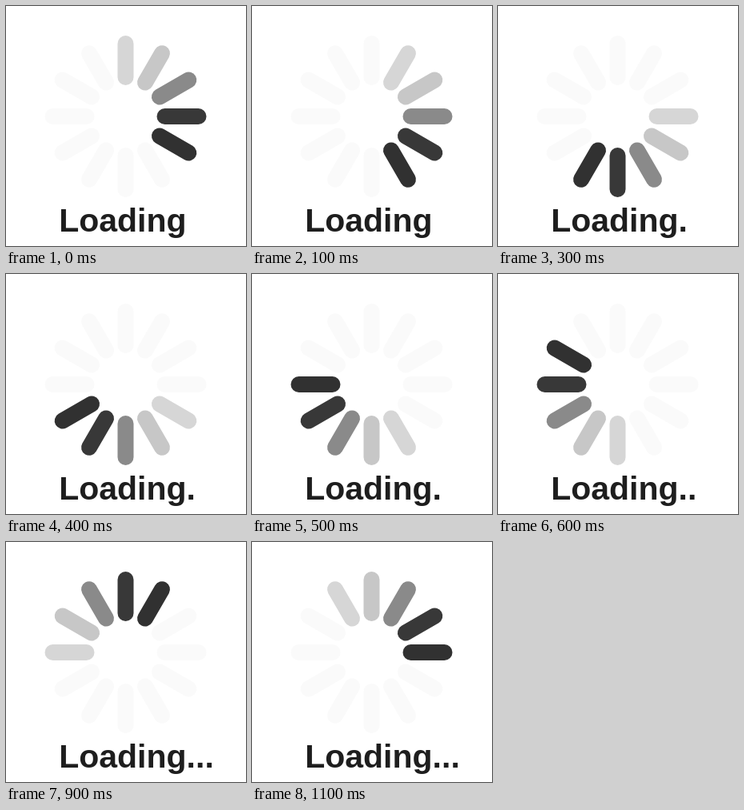
Animation of 300x300 px, one loop 1200 ms. Source, as an HTML page:

```html
<!DOCTYPE html>
<html lang="en">
<head>
<meta charset="utf-8">
<title>Loading</title>
<style>
html, body { margin: 0; width: 100%; height: 100%; overflow: hidden; background: #fff; }
svg { display: block; width: 100vw; height: 100vh; }
line { stroke-width: 20; stroke-linecap: round; }
text { font: bold 41px "Liberation Sans", Arial, Helvetica, sans-serif; fill: #1e1e1e; }
</style>
</head>
<body>
<svg viewBox="0 0 300 300">
  <g id="spokes" transform="translate(149.5 138)"></g>
  <text id="label" x="66.2" y="282.3">Loading</text>
</svg>
<script>
const COUNT = 12, STEP = 100, FIRST = 4;
const TRAIL = ['#313131', '#383838', '#8a8a8a', '#c7c7c7', '#d6d6d6'];
const REST = '#fafafa';
const label = document.getElementById('label');

const spokes = Array.from({ length: COUNT }, (_, i) => {
  const line = document.createElementNS('http://www.w3.org/2000/svg', 'line');
  line.setAttribute('y1', -49);
  line.setAttribute('y2', -91);
  line.setAttribute('transform', `rotate(${i * 360 / COUNT})`);
  return document.getElementById('spokes').appendChild(line);
});

const start = performance.now();

function draw() {
  const step = Math.floor((performance.now() - start) / STEP) % COUNT;
  const head = step + FIRST;
  spokes.forEach((spoke, i) => {
    const age = (head - i + COUNT) % COUNT;
    spoke.setAttribute('stroke', TRAIL[age] || REST);
  });
  // One more dot every quarter turn
  label.textContent = 'Loading' + '.'.repeat(Math.floor(step / 3));
  requestAnimationFrame(draw);
}
draw();
</script>
</body>
</html>
```
